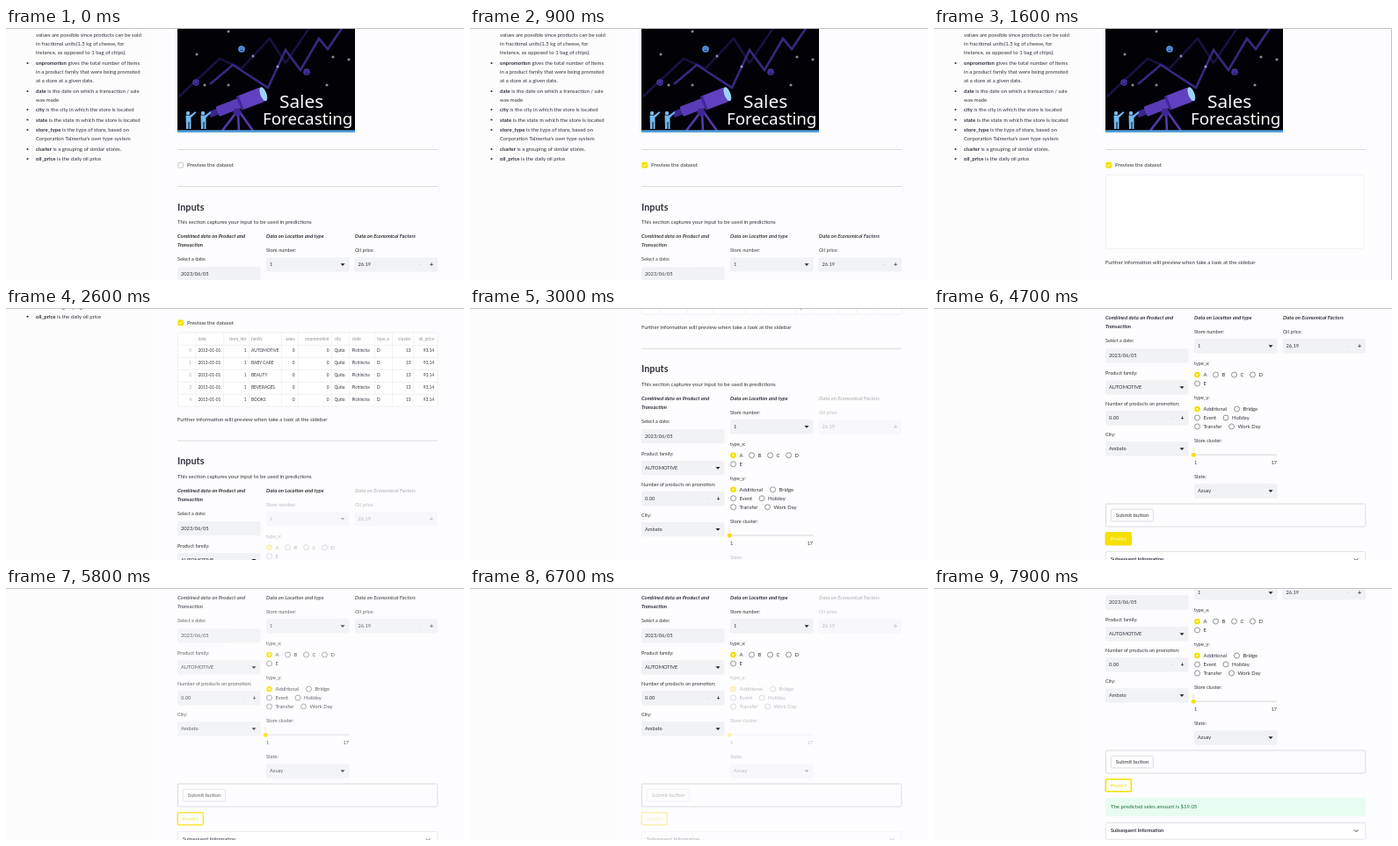
An HTML page that plays this animation: 521 by 287 pixels, repeating every 8 s.

```html
<!DOCTYPE html>
<html lang="en">
<head>
<meta charset="utf-8">
<title>Sales forecasting app</title>
<style>
html, body { margin: 0; width: 100%; height: 100%; overflow: hidden; background: #fdfcfe; }
svg { display: block; font-family: Lato, sans-serif; fill: #31333f; }
.b { font-weight: 700; }
.h { font-weight: 700; font-style: italic; }
.r { text-anchor: end; }
.m { text-anchor: middle; }
.poster { font-family: "Noto Sans", sans-serif; fill: #fff; }
</style>
</head>
<body>
<svg id="stage" width="521" height="287" viewBox="0 0 521 287"></svg>
<script>
const YELLOW = '#f5e000', LOOP = 8000;
const stage = document.getElementById('stage');
const $ = id => document.getElementById(id);

// Drawing helpers; the y of a text is the middle of its line.
const text = (x, y, s, size = 6.1, cls = '', fill = '') =>
  `<text x="${x}" y="${y + size * .35}" font-size="${size}" class="${cls}" ${fill && `fill="${fill}"`}>${s}</text>`;
const rect = (x, y, w, h, fill, stroke = 'none', r = 0, sw = .8) =>
  `<rect x="${x}" y="${y}" width="${w}" height="${h}" rx="${r}" fill="${fill}" stroke="${stroke}" stroke-width="${sw}"/>`;
const circle = (x, y, r, fill, stroke = 'none', sw = .8) =>
  `<circle cx="${x}" cy="${y}" r="${r}" fill="${fill}" stroke="${stroke}" stroke-width="${sw}"/>`;
const path = (d, stroke, sw = .8, fill = 'none') =>
  `<path d="${d}" fill="${fill}" stroke="${stroke}" stroke-width="${sw}"/>`;
const rule = (y, x = 195, w = 296, color = '#dcdce0') => rect(x, y, w, 1, color);
const group = (id, body) => `<g id="${id}">${body}</g>`;

// Form widgets
const label = (x, y, s) => text(x, y, s, 5.5);
const field = (x, y, value) => rect(x, y - 7.8, 94.5, 16.4, '#f0f2f4', 'none', 1.5) + text(x + 4, y + .4, value, 5.7);
const select = (x, y, value) => field(x, y, value) +
  path(`M${x + 84.5} ${y - .8}h5l-2.5 2.7z`, 'none', 0, '#222');
const stepper = (x, y, value) => field(x, y, value) +
  text(x + 75, y, '–', 6, 'm', '#c4c5ca') + text(x + 87.5, y + .4, '+', 7, 'm b');
const radio = (x, y, s, on) =>
  (on ? circle(x, y, 2.2, '#fff', YELLOW, 2.3) : circle(x, y, 3, '#fff', '#666', .7)) + text(x + 7, y, s, 5.9);

function sidebar() {
  const lines = [
    [8, '', 'values are possible since products can be sold'],
    [18, '', 'in fractional units(1.5 kg of cheese, for'],
    [28, '', 'instance, as opposed to 1 bag of chips).'],
    [40, 'onpromotion', 'gives the total number of items'],
    [50, '', 'in a product family that were being promoted'],
    [60, '', 'at a store at a given date.'],
    [72, 'date', 'is the date on which a transaction / sale'],
    [82, '', 'was made'],
    [93, 'city', 'is the city in which the store is located'],
    [104.5, 'state', 'is the state in which the store is located'],
    [116, 'store_type', 'is the type of store, based on'],
    [126, '', "Corporation Talmerisa's own type system"],
    [138, 'cluster', 'is a grouping of similar stores.'],
    [149, 'oil_price', 'is the daily oil price']
  ];
  return lines.map(([y, term, rest]) =>
    (term && circle(24.5, y, 1.1, '#31333f')) +
    text(34, y, (term && `<tspan class="b">${term}</tspan> `) + rest, 6)).join('');
}

function poster() {
  const stars = [[226, 65], [253, 65], [281, 32], [217, 30], [253, 4], [372, 33], [365, 65], [390, 36], [309, 44]];
  const faces = [[268, 24, '#4f9be8'], [216, 62, '#4a32a0'], [342, 50, '#4a32a0']];
  const person = (x, y) => circle(x, y, 2.2, '#74b9f2') +
    path(`M${x - 2.5} ${y + 2.6}h5l6 -4.5 .8 1.3 -5.8 5.6v13h-2v-8h-1v8h-2.5z`, 'none', 0, '#74b9f2');
  return rect(195, -40, 202, 159, '#020106') +
    path('M197 78L243 35 268 46 300 12 318 40 345 0', '#1c1145', 2.4) +
    path('M232 64L258 42 298 68 318 25 335 48 356 12 366 24 385 -4', '#3a277f', 2.6) +
    stars.map(([x, y]) => path(`M${x - 1.6} ${y}h3.2M${x} ${y - 1.6}v3.2`, '#d8d4f0', .8)).join('') +
    faces.map(([x, y, c]) => circle(x, y, 3.8, c) +
      path(`M${x - 2} ${y + .7}q2 2.4 4 0M${x - 1.6} ${y - 1.2}h.9m1.4 0h.9`, '#10082c', .8)).join('') +
    path('M262 96L246 117M264 96L265 117M266 96L281 117', '#5538ad', 2.6) +
    `<g transform="translate(262 87) rotate(-21)">` +
    rect(-33, -3.5, 12, 7, '#3d2790', 'none', 2) + rect(-23, -6, 29, 12, '#5a3cb8', 'none', 2) +
    rect(4, -8.5, 28, 17, '#6042c0', 'none', 2) + rect(3, -8.5, 3, 17, '#3d2790') +
    `<ellipse cx="33" cy="0" rx="3.5" ry="8.5" fill="#9bd2ff"/></g>` +
    circle(263, 96, 4.5, '#3d2790') + person(207, 97) + person(224, 97) +
    rect(195, 116.3, 202, 2.7, '#5a9fdc') +
    text(311, 84, 'Sales', 20.8, 'poster') + text(292, 103.5, 'Forecasting', 18.8, 'poster');
}

function table() {
  // [text x, right aligned, header, value]
  const columns = [
    [218.5, 0, 'date', '2013-01-01'], [273.5, 1, 'store_nbr', 1], [279, 0, 'family'], [328.5, 1, 'sales', 0],
    [367.5, 1, 'onpromotion', 0], [373.5, 0, 'city', 'Quito'], [393.5, 0, 'state', 'Pichincha'],
    [422, 0, 'type_x', 'D'], [460.5, 1, 'cluster', 13], [487, 1, 'oil_price', '93.14']
  ];
  const families = ['AUTOMOTIVE', 'BABY CARE', 'BEAUTY', 'BEVERAGES', 'BOOKS'];
  const dividers = [215, 247, 276, 313, 332, 370, 390, 419, 439, 463];
  let out = rect(195.3, 167.3, 295.6, 84, '#fff', '#ececef', 1.5) +
    dividers.map(x => rect(x, 167, .7, 84, '#efeff1')).join('');
  for (const [x, right, head] of columns) out += text(x, 174.5, head, 4.8, right ? 'r' : '', '#8f9097');
  families.forEach((family, i) => {
    const y = 188 + 14 * i;
    out += rule(y - 7, 195, 296, '#efeff1') + text(211, y, i, 4.8, 'r', '#a5a6ab');
    for (const [x, right, , value = family] of columns) out += text(x, y, value, 4.8, right ? 'r' : '');
  });
  return out;
}

// Form parts: when each one is refreshed in the first and in the second run, and its drawing.
const parts = [
  [2050, 6100, text(195, 11, 'Combined data on Product and', 5.9, 'h') + text(195, 21, 'Transaction', 5.9, 'h')],
  [2100, 6200, label(195, 37, 'Select a date:') + field(195, 54, '2023/06/05')],
  [2200, 6300, label(195, 74, 'Product family:') + select(195, 90, 'AUTOMOTIVE')],
  [2300, 6400, label(195, 109, 'Number of products on promotion:') + stepper(195, 125, '0.00')],
  [2400, 6400, label(195, 144, 'City:') + select(195, 160, 'Ambato')],
  [2500, 6500, text(296, 11, 'Data on Location and type', 5.9, 'h')],
  [2700, 6600, label(296, 27, 'Store number:') + select(296, 43, '1')],
  [2800, 6700, label(296, 63, 'type_x:') + radio(299.5, 76, 'A', true) + radio(320.5, 76, 'B') +
    radio(341.5, 76, 'C') + radio(362.5, 76, 'D') + radio(299.5, 86, 'E')],
  [2900, 7000, label(296, 102, 'type_y:') + radio(299.5, 115, 'Additional', true) + radio(344.5, 115, 'Bridge') +
    radio(299.5, 125, 'Event') + radio(332, 125, 'Holiday') +
    radio(299.5, 135, 'Transfer') + radio(338.5, 135, 'Work Day')],
  [3000, 7000, label(296, 151, 'Store cluster:') + text(295, 161, '1', 5.2, 'm', YELLOW) +
    rect(295, 166.6, 95, 1.2, '#dcdde1') + circle(295.3, 167.3, 2.5, YELLOW) +
    text(296, 176, '1', 5.6) + text(390, 176, '17', 5.6, 'r')],
  [3300, 7100, label(296, 192, 'State:') + select(296, 208, 'Azuay')],
  [3700, 7300, text(397, 11, 'Data on Economical Factors', 5.9, 'h')],
  [3800, 7300, label(397, 27, 'Oil price:') + stepper(396.5, 43, '26.19')],
  [3900, 7100, rect(201.3, 229.3, 48, 13.6, '#fff', '#d5d6da', 1.5) + text(225.5, 236, 'Submit button', 6, 'm')],
  [4000, 7300, '<rect id="button" x="195.3" y="255.8" width="29" height="14" rx="1.5"/>' +
    '<text id="caption" x="209.8" y="264.8" font-size="6" class="m">Predict</text>'],
  [4100, 7300, group('expander', rect(195.4, 277.4, 295.4, 18.8, '#fff', '#dcdde1', 1.5) +
    text(201, 286.5, 'Subsequent Information', 5.6, 'b') + path('M478 285.4l2.2 2.2 2.2 -2.2', '#333', 1))]
];

stage.innerHTML =
  rect(0, 0, 165, 287, '#fcfcfd') +
  group('page',
    sidebar() + poster() + rule(138) + text(206, 156, 'Preview the dataset') +
    group('unchecked', rect(195.8, 153.2, 5.8, 5.8, '#fff', '#b9bac0', 1)) +
    group('checked', rect(195.4, 152.8, 6.8, 6.6, YELLOW, 'none', 1) + path('M196.9 156l1.4 1.4 2.5 -2.8', '#fff', 1)) +
    group('preview', group('empty', rect(195.3, 167.3, 293.4, 84, '#fff', '#ececef', 1.5)) + group('rows', table()) +
      text(195, 266.5, 'Further information will preview when take a look at the sidebar')) +
    group('form',
      rule(-46) + text(195, -22.3, 'Inputs', 10.9, 'b') +
      text(195, -5, 'This section captures your input to be used in predictions') +
      rect(195.4, 223, 295.4, 26, 'none', '#d2d3d7', 1.5) +
      parts.map((p, i) => group('part' + i, p[2])).join('') +
      group('result', rect(195, 277, 296, 21, '#e8fdf1', 'none', 1.5) +
        text(201, 287, 'The predicted sales amount is $19.05', 6, '', '#1b6e3c')))) +
  rect(0, 0, 521, 1, '#c4c4c8') + group('loading', rect(520, 0, 1, 287, '#c4c4c8'));

const CLICKS = [100, 4700];
const scrollPoints = [[0, 0], [1850, 0], [2100, 40], [2600, 139], [2700, 165], [3000, 244], [3300, 315],
  [3500, 336], [7300, 336], [7500, 358], [7800, 374], [LOOP, 374]];

function scrollAt(t) {
  const i = scrollPoints.findIndex(p => p[0] > t);
  const [t0, y0] = scrollPoints[i - 1], [t1, y1] = scrollPoints[i];
  return y0 + (y1 - y0) * (t - t0) / (t1 - t0);
}

// After a click a part slowly goes pale until it is refreshed at once.
function opacityAt(t, refreshed) {
  const run = t < CLICKS[1] ? 0 : 1;
  if (t >= refreshed[run]) return 1;
  const k = Math.min(1, Math.max(0, (t - CLICKS[run] - 500) / 1000));
  return 1 - .69 * k * k;
}

const show = (id, on) => $(id).setAttribute('display', on ? 'inline' : 'none');
const move = (id, y) => $(id).setAttribute('transform', `translate(0 ${y})`);
function paint(id, fill, stroke = 'none', width = 0) {
  for (const [key, value] of Object.entries({ fill, stroke, 'stroke-width': width })) $(id).setAttribute(key, value);
}

function draw(t) {
  const previewed = t >= 1000, loaded = t >= 1700, predicted = t >= 7300;
  move('page', -scrollAt(t));
  move('form', previewed ? 336 : 226);
  move('expander', predicted ? 28 : 0);
  show('unchecked', t < CLICKS[0]);
  show('checked', t >= CLICKS[0]);
  show('preview', previewed);
  show('empty', !loaded);
  show('rows', loaded);
  show('loading', previewed && !loaded);
  show('result', predicted);
  parts.forEach((p, i) => $('part' + i).setAttribute('opacity', opacityAt(t, p)));

  const hover = t >= 4100, pressed = t >= CLICKS[1] && t < CLICKS[1] + 200;
  paint('button', pressed ? YELLOW : '#fff', hover ? YELLOW : '#d5d6da', t >= CLICKS[1] ? 1.6 : .8);
  paint('caption', pressed ? '#fffbd0' : hover ? YELLOW : '#31333f');
}

function tick() {
  draw(performance.now() % LOOP);
  requestAnimationFrame(tick);
}
tick();
</script>
</body>
</html>
```
